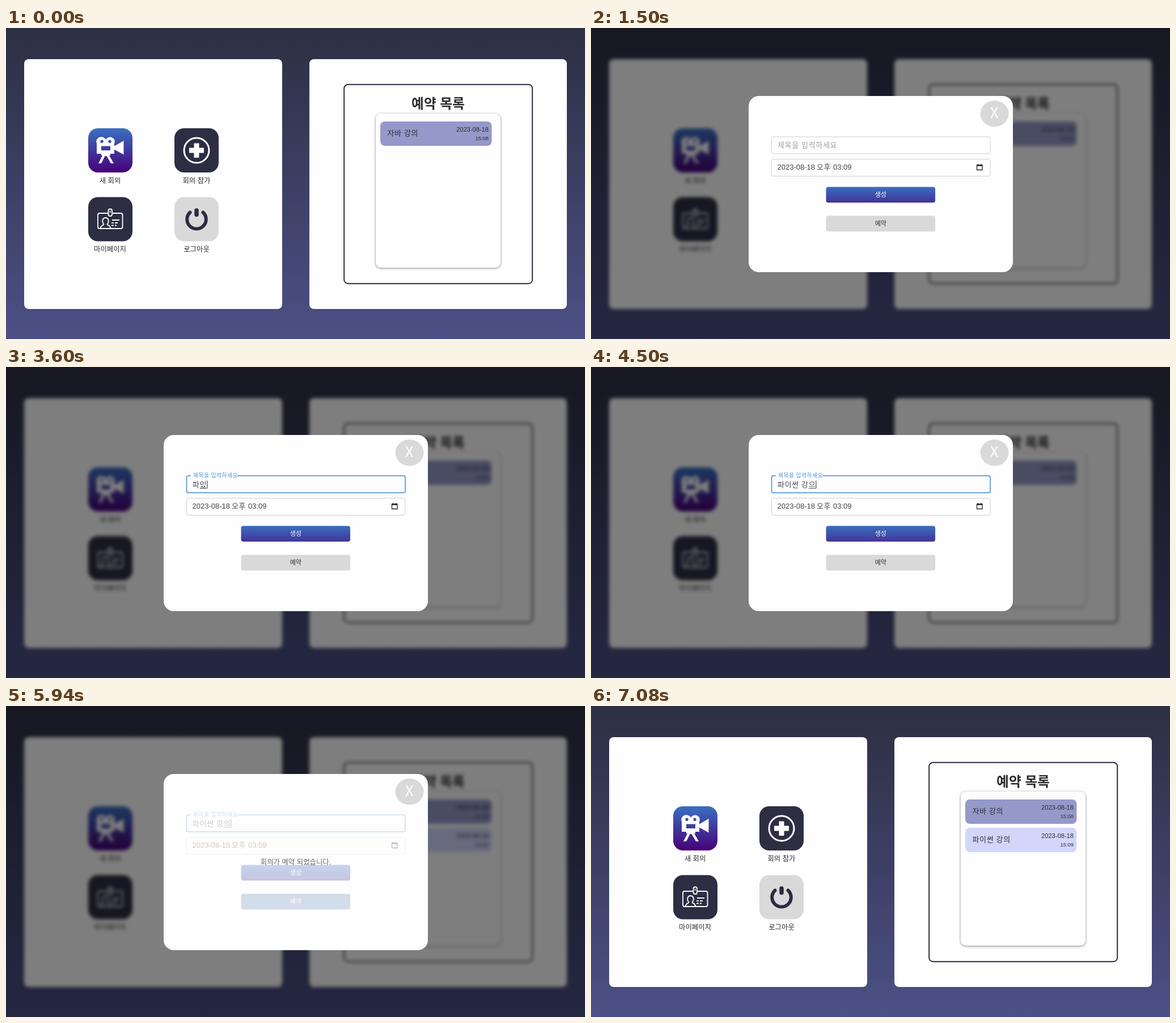
These frames come from a looping animation (1021 by 549 pixels, 8000 ms). An HTML page:

```html
<!DOCTYPE html>
<html lang="ko">
<head>
<meta charset="utf-8">
<style>
html, body { margin: 0; width: 100%; height: 100%; overflow: hidden; background: #2d2f42; }
svg { display: block; width: 1021px; height: 549px; }
text { font: 12.4px 'Noto Sans CJK KR', 'Noto Sans CJK', sans-serif; fill: #2b2b2b; white-space: pre; }
.mid { text-anchor: middle; }
.title { font-size: 23.7px; font-weight: 700; }
.field { font-size: 13px; letter-spacing: .65px; fill: #444; }
.num { font-family: 'Liberation Sans', Arial, sans-serif; letter-spacing: 0; }
.end { text-anchor: end; }
.btn { font-size: 11px; }
.close { font-size: 26px; }
</style>
</head>
<body>
<svg viewBox="0 0 1021 549">
  <defs>
    <linearGradient id="sky" x2="0" y2="1"><stop stop-color="#2d2f42"/><stop offset="1" stop-color="#4c5086"/></linearGradient>
    <linearGradient id="violet" x2="0" y2="1"><stop stop-color="#3a70c2"/><stop offset="1" stop-color="#470078"/></linearGradient>
    <linearGradient id="indigo" x2="0" y2="1"><stop stop-color="#3a6ebf"/><stop offset="1" stop-color="#423398"/></linearGradient>
  </defs>
  <rect width="1021" height="549" fill="url(#sky)"/>

  <g id="scene">
    <g fill="#fefefe">
      <rect x="32" y="55" width="455" height="441" rx="8"/>
      <rect x="535" y="55" width="454" height="441" rx="8"/>
    </g>

    <!-- menu -->
    <rect id="newTile" x="145" y="177" width="78" height="78" rx="17"/>
    <circle id="ripple" cx="208" cy="206" r="4" fill="#5878aa"/>
    <g fill="#fff" fill-rule="evenodd">
      <path d="M160 204a8.5 8 0 0 1 16-7a8 7.500 0 0 1 15 7V222H160ZM169 197.500a2.800 2.800 0 1 0 .1 0ZM183 197.500a2.800 2.800 0 1 0 .1 0ZM168 208.500V216H184V208.500Z"/>
      <path d="M191 208.500L207.500 199V223.500L191 214.500Z"/>
      <path d="M168 222H184V225H182L190 239H185L177.500 226H174.500L168 239H163L170 225H168Z"/>
    </g>
    <text class="mid" x="183.500" y="273.500">새 회의</text>

    <g fill="#2d2e44">
      <rect x="297" y="177" width="78" height="78" rx="17"/>
      <rect x="145" y="298.500" width="78" height="78" rx="17"/>
    </g>
    <circle cx="336" cy="216" r="22" fill="none" stroke="#fff" stroke-width="3"/>
    <path d="M323 216H349M336 203.500V229" stroke="#fff" stroke-width="9"/>
    <text class="mid" x="336" y="273.500">회의 참가</text>

    <g fill="none" stroke="#fff" stroke-width="1.800">
      <rect x="162" y="327" width="43.500" height="27" rx="3"/>
      <rect x="180.500" y="319.500" width="6.500" height="12.500" rx="3" fill="#2d2e44"/>
      <path d="M183.800 322.500V326" stroke-width="1.500"/>
      <path d="M167 353C167 348 172 349 172.500 346.500C168.500 342 170 335 175.500 335S182.500 342 178.500 346.500C179 349 184 348 184 353"/>
      <path d="M187 339H200M186 344H190M192 344H197M186 348.500H190M192 348.500H195"/>
    </g>
    <text class="mid" x="183.500" y="394.500">마이페이지</text>

    <rect x="297" y="298.500" width="78" height="78" rx="17" fill="#d9d9d9"/>
    <g fill="none" stroke="#2d2a44" stroke-linecap="round">
      <path d="M324.500 325.500A16.800 16.800 0 1 0 347.500 325.500" stroke-width="6"/>
      <path d="M336 322V329.500" stroke-width="7.500"/>
    </g>
    <text class="mid" x="336" y="394.500">로그아웃</text>

    <!-- reservations -->
    <rect x="596.200" y="99.700" width="332" height="351.500" rx="7" fill="none" stroke="#2d2a45" stroke-width="2"/>
    <text class="mid title" x="762" y="141.500">예약 목록</text>
    <rect x="652" y="151" width="220" height="272" rx="9" fill="#fefefe" style="filter:drop-shadow(0 1px 2px #0007)"/>
    <g id="list"></g>
  </g>

  <g id="modal">
    <rect width="1021" height="549" opacity=".5"/>
    <rect x="278" y="120" width="466" height="311" rx="18" fill="#fefefe"/>
    <ellipse cx="711.500" cy="151.200" rx="25" ry="23.300" fill="#d9d9d9"/>
    <text id="close" class="mid close" x="711.300" y="158.700">X</text>

    <g id="form">
      <rect id="titleBox" x="318.500" y="192" width="385.500" height="30" rx="3" fill="none"/>
      <rect id="notch" x="326" y="190" height="4" fill="#fefefe"/>
      <text id="label" class="field">제목을 입력하세요</text>
      <text id="typed" class="field" x="329" y="212"></text>
      <path id="underline" stroke="#555"/>
      <path id="caret" stroke="#222"/>

      <rect x="318.500" y="231.500" width="385.500" height="30" rx="3" fill="none" stroke="#cfcfcf"/>
      <g class="field">
        <text class="field num" x="328.500" y="250.300" font-size="12.600">2023-08-18</text>
        <text class="field" x="398" y="250">오후</text>
        <text class="field num" x="427" y="250.300">03:09</text>
      </g>
      <path d="M680.500 242H690V250.500H680.500ZM680.500 243H690M682.500 240V242M688 240V242" fill="none" stroke="#222" stroke-width="1.300"/>

      <rect x="414.500" y="280.500" width="192.500" height="27.700" rx="4" fill="url(#indigo)"/>
      <text class="mid btn" x="510.800" y="298" style="fill:#fff;font-weight:500">생성</text>
      <rect id="reserve" x="414.500" y="331.500" width="192.500" height="27.700" rx="4"/>
      <text id="reserveText" class="mid btn" x="510.800" y="349">예약</text>
    </g>
    <text id="message" class="mid" x="511" y="279.500">회의가 예약 되었습니다.</text>
  </g>
</svg>
<script>
const $ = id => document.getElementById(id);
const set = (id, attrs) => { for (const k in attrs) $(id).setAttribute(k, attrs[k]); };
const show = (id, on) => { $(id).style.display = on ? '' : 'none'; };
const progress = (t, start, length) => Math.min(1, Math.max(0, (t - start) / length));

const booking = (id, y, name, time, color) => `<g id="${id}">
  <rect x="660" y="${y}" width="196.500" height="43" rx="8" fill="${color}"/>
  <text class="field" x="672.500" y="${y + 24.5}" style="fill:#2b2b35">${name}</text>
  <text class="num end" x="851" y="${y + 18}" style="font-size:11.150px">2023-08-18</text>
  <text class="num end" x="851" y="${y + 32.5}" style="font-size:9.400px">${time}</text></g>`;
$('list').innerHTML = booking('first', 165, '자바 강의', '15:08', '#9599c9')
                    + booking('second', 215, '파이썬 강의', '15:09', '#d2d6fb');

const LOOP = 8000, BLINK = 480, FOCUS = 2100, OPEN = 1500, SAVED = 5820, CLOSE = 7080;
const HOVER = '#6588be';
const keys = [
  [FOCUS, ''], [3060, 'ㅍ'], [3180, '파'], [3240, '팡'], [3360, '파이'],
  [3600, '파있'], [3720, '파이써'], [3840, '파이썬'], [3900, '파이썬 '], [4020, '파이썬 가'],
  [4200, '파이썬 강'], [4320, '파이썬 강ㅇ'], [4500, '파이썬 강으'], [4620, '파이썬 강의']
];

// Hovering drops the resting fill and fades the hover colour in.
function hoverFill(id, rest, on, amount) {
  set(id, { fill: on ? HOVER : rest, 'fill-opacity': on ? amount : 1 });
}

function drawTitleField(t) {
  const focused = t >= FOCUS;
  const p = 1 - (1 - progress(t, FOCUS - 20, 200)) ** 3;
  set('titleBox', { stroke: focused ? '#4189d4' : '#cfcfcf', 'stroke-width': focused ? 1.5 : 1 });
  set('notch', { width: 82 * p });
  set('label', { transform: `translate(${329 + p} ${211 - 16.5 * p}) scale(${1 - .25 * p})` });
  $('label').style.fill = focused ? '#4c92da' : '#a0a0a0';

  const [time, text] = keys.filter(k => k[0] <= t).pop() || keys[0];
  $('typed').textContent = text;
  const end = 329 + (text ? $('typed').getComputedTextLength() : 0);
  set('underline', { d: `M${end - 12.5} 214.500H${end - .5}` });
  set('caret', { d: `M${end + .5} 200.500V214.500` });
  show('underline', text && !text.endsWith(' '));
  show('caret', focused && Math.floor((t - time) / BLINK) % 2 === 0);
}

function draw(t) {
  const open = t >= OPEN && t < CLOSE;
  hoverFill('newTile', 'url(#violet)', t >= 840 && t < OPEN, progress(t, 825, 135));
  show('ripple', t >= 1440 && t < OPEN);
  show('second', t >= SAVED);
  $('scene').style.filter = open ? 'blur(3px)' : 'none';
  show('modal', open);
  if (!open) return;

  drawTitleField(t);
  const hovered = t >= 5460;
  hoverFill('reserve', '#d9d9d9', hovered, .05 + .95 * progress(t, 5460, 180));
  $('reserveText').style.fill = hovered ? '#fff' : '#333';

  const swap = progress(t, SAVED - 30, 210);
  set('form', { opacity: t < SAVED ? 1 : 1 - swap });
  set('message', { opacity: t < SAVED ? 0 : swap });
  $('close').style.fill = t >= 6660 ? '#111' : '#fff';
}

function tick() {
  draw(performance.now() % LOOP);
  requestAnimationFrame(tick);
}
tick();
</script>
</body>
</html>
```
